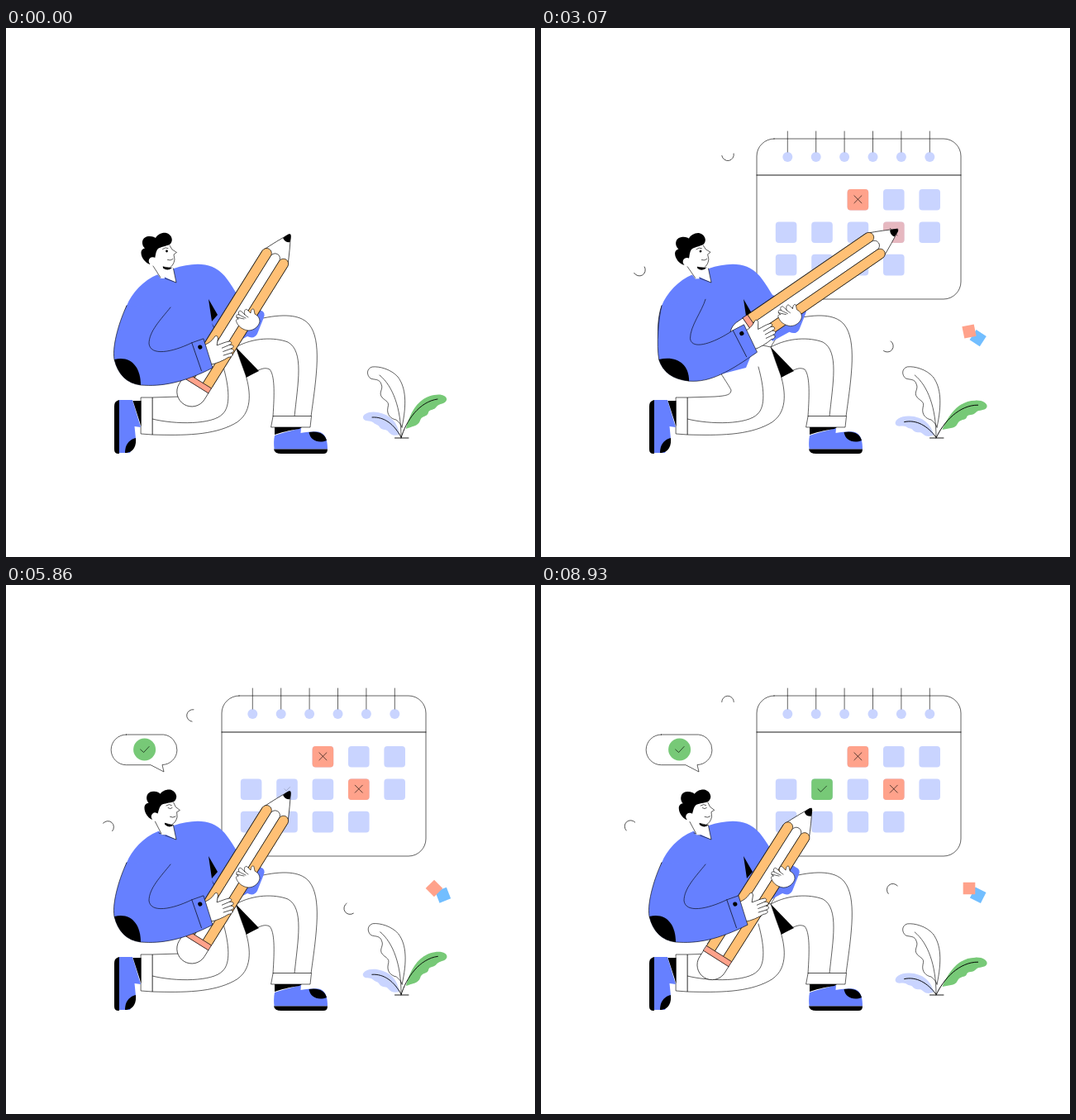
Write an HTML page that moves like this. It is 640 by 640 pixels and loops after 9 s.

```html
<!DOCTYPE html>
<html lang="en">
<head>
<meta charset="utf-8">
<title>Planning with a pencil</title>
<style>
  html, body { margin: 0; width: 100%; height: 100%; overflow: hidden; background: #fff; }
  svg { display: block; width: 100%; height: 100%; }
  .line, .skin, .edge { stroke: #000; stroke-width: .62; stroke-linejoin: round; stroke-linecap: round; }
  .line { fill: none; }
  .skin, .white { fill: #fff; }
  .bold { stroke-width: .9; }
  .blue { fill: #6680ff; }
  .lilac { fill: #c9d4ff; }
  .coral { fill: #ffa28b; }
  .green { fill: #77c977; }
  .orange { fill: #ffc075; }
</style>
</head>
<body>
<svg viewBox="0 0 640 640" xmlns="http://www.w3.org/2000/svg">
  <g id="calendar">
    <rect class="skin" x="261" y="134" width="247" height="194" rx="21"/>
    <path class="line bold" d="M261 178H508"/>
    <g id="pins"></g>
    <g id="dates"></g>
  </g>

  <g id="arcs"></g>
  <rect id="sqBlue" x="-7.3" y="-7.3" width="14.6" height="14.6" fill="#72beff"/>
  <rect id="sqCoral" class="coral" x="-7.3" y="-7.3" width="14.6" height="14.6"/>

  <g id="bubble">
    <path class="skin" d="M145.500 181H190.500A18.300 18.300 0 0 1 189 217.500L191 226L175 217.700H145.500A18.350 18.350 0 0 1 145.500 181Z"/>
  </g>
  <g id="tick">
    <circle class="green" r="13.500"/>
    <path class="line" d="M-5 0L-1 3.500L5.500 -3.500"/>
  </g>

  <g id="leafLilac">
    <path class="lilac" d="M476 492C474 478 466 468 450 465C440 463 431 467 432 472C434 477 440 474 444 477C448 481 450 479 452 483C456 488 460 484 463 489C467 494 472 493 476 492Z"/>
    <path class="line bold" d="M443 471C458 470 470 480 478 495"/>
  </g>
  <g id="leafGreen">
    <path class="green" d="M484 484C490 462 500 447 518 444C528 442 534 446 533 450C532 455 524 454 521 458C518 463 512 461 511 465C510 471 503 468 501 475C499 482 490 482 484 485Z"/>
    <path class="line bold" d="M478 496C484 475 500 452 522 449"/>
  </g>
  <g id="leafWhite">
    <path class="skin" d="M479 483C485 455 484 435 474 422C466 413 452 409 443 410C436 412 436 420 441 424C446 426 452 424 454 431C457 437 450 441 455 447C460 452 464 452 462 459C460 468 466 473 472 474C476 477 478 480 479 483Z"/>
    <path class="line" d="M452 420C468 433 478 460 478 495"/>
  </g>
  <path class="line bold" d="M470.500 496H487"/>

  <g id="legs">
    <path class="skin" d="M278 386C290 365 300 353 311 351C340 345 358 348 367 359C382 378 376 420 369 470H323C325 440 325 420 319 413C313 410 308 413 303 415L290 423Z"/>
    <path class="line" d="M278 386C300 374 325 374 341 380C361 391 353 430 349 470"/>
    <path class="skin" d="M323.500 469.500H369.500L368 483H321Z"/>
    <path d="M278 386L306 415L290 423Z"/>
    <path class="skin" d="M217 417C224 428 228 434 230 438C230 444 224 445 210 446L177 447V492C215 493 250 493 276 479C299 467 296 440 290 420Q284 404 278 386L250 380Z"/>
    <path class="line" d="M263 410C270 435 272 458 262 467C250 480 205 480 177 473"/>
    <path class="skin" d="M163.500 447H177V492L163.500 491Z"/>
    <path class="blue" d="M137 450H153L163 483L155.500 482L157 497L150 514H137Z"/>
    <path d="M137 450V515C132 515 131 513 131 509V458C131 453 133 451 137 450Z"/>
    <path d="M153.500 451H163.500V482ZM144 514C144 504 149 498 157 496C158 506 154 514 144 514Z"/>
    <path class="blue" d="M325 493C340 488 350 486 357 484L356.500 490C364 489 372 488 378 488.500C386 490 389 497 389 509.500H324.500Q323.500 500 325 493Z"/>
    <path d="M325 483H358L355 485C342 487 333 489 325 492ZM324 509.500H389Q389 515 384 515H333Q325 515 324 509.500ZM366.500 489C378 487 386 491 388 499C378 503 368 499 366.500 489Z"/>
  </g>

  <g id="torso">
    <path class="blue" d="M184 298C166 305 152 321 146 336C141 350 140 370 144 385L170 405L217 419L248 411L264 372L288 345L280 323C268 303 260 290 241 286.500C229 284.500 215 287 203 291Z"/>
    <path class="line" d="M146 336C141 350 140 370 144 385"/>
    <path id="farSleeve" class="blue"/>
    <path d="M245 328L256 347L249 355ZM249 357L254 366L251 362Z"/>
    <path class="white" d="M185 298L206 308L202 289Z"/>
    <path class="line" d="M185 300L206 308L202.500 291"/>
  </g>

  <g id="head">
    <path class="white" d="M180 268L198 262L201 267L206 271L202 274L204 280Q204 287 197 290L190 289L192 303H187L175 286Z"/>
    <path class="line" d="M198 263L201 268L206.500 271.500L203 274L204 280Q203 287 198 290L190 289M178 288L187 302"/>
    <path d="M190 288.500Q196 291 201.500 289.500Q196 295 190 290.500Z"/>
    <path d="M181 254C183 250 189 247 194 248C201 250 203 258 198 262C193 264 187 265 184 267C181 270 181 276 180 279L174 286C168 284 163 277 163.500 271C164 268 166 267 168 266.500C163 262 164 253 172 252C177 251.500 180 253 181 254Z"/>
    <circle class="white" cx="177.500" cy="282" r="4.800"/>
    <path class="line" d="M189.500 267.500Q193 264.500 196 266.500M195.500 280.500Q199 282 202 279.500"/>
    <circle id="eye" cx="194.500" cy="270" r="1.400"/>
    <path id="lid" class="line" d="M192 270Q195 272 197 269.500"/>
  </g>

  <g id="pencil">
    <path class="skin" d="M-18 34Q-9 14 -1.500 1Q0 -1 1.500 1Q9 14 18 34V206H-18Z"/>
    <path d="M-4.800 8Q-2.500 0 0 -.8Q2.500 0 4.800 8Q0 11.500 -4.800 8Z"/>
    <g id="strips"></g>
    <path class="skin" d="M-18 215V224a18 18 0 0 0 36 0V215Z"/>
    <rect class="coral edge" x="-18" y="208" width="36" height="7"/>
  </g>

  <g id="farHand">
    <path class="skin" d="M279 350C278 347 280 346 282 347C280 343 283 341 285 343L289 347C287 342 290 339 292 341L296 345C296 341 299 338 300 341L301 346Q307 349 307 355C306 361 300 366 293 366C286 365 281 361 279 356C278 354 278 352 281 352Z"/>
    <path class="line" d="M279 350L288 352M282 347L290 351M289 347L293 350"/>
  </g>

  <g id="nearHand">
    <path class="skin" d="M-2 -11C6 -11 10 -14 14 -17C17 -18 18 -15 16 -12L13 -6C19 -6 24 -7 29 -6C32 -5 31 -2 28 -2C33 -1 33 3 28 3C32 5 31 8 27 8C29 11 27 13 22 12C15 14 6 15 -2 14Z"/>
    <path class="line" d="M28 -2L18 -1M28 3L18 3.500M27 8L17 8"/>
  </g>
  <path id="sleeve" class="blue edge"/>
  <path id="elbow"/>
  <g id="cuff">
    <path class="line" d="M-15 -18L-14 18"/>
    <circle cx="-7" cy="-10" r="2.600"/>
  </g>
</svg>
<script>
const LOOP = 9000;
const $ = id => document.getElementById(id);
const part = (t, from, to) => Math.max(0, Math.min(1, (t - from) / (to - from)));
const smooth = (...span) => { const x = part(...span); return x * x * (3 - 2 * x); };
const easeOut = (...span) => 1 - (1 - part(...span)) ** 3;
const wave = (t, period) => .5 - .5 * Math.cos(2 * Math.PI * t / period);
const set = (el, name, value) => el.setAttribute(name, value);
const place = (el, x, y, turn = 0, scale = 1) =>
  set(el, 'transform', `translate(${x} ${y}) rotate(${turn}) scale(${scale})`);
const swing = (id, turn, x, y) => set($(id), 'transform', `rotate(${turn} ${x} ${y})`);

function add(parent, tag, attrs) {
  const el = document.createElementNS('http://www.w3.org/2000/svg', tag);
  for (const name in attrs) set(el, name, attrs[name]);
  return parent.appendChild(el);
}

const pins = [];
for (let i = 0; i < 6; i++) {
  const x = 298.3 + i * 34.4;
  add($('pins'), 'circle', { class: 'lilac', cx: x, cy: 156, r: 6 });
  pins.push(add($('pins'), 'path', { class: 'line', d: `M${x} 150V125` }));
}

// Grid of days; the first two and the last cells are empty.
const dayAt = (col, row) => ({ x: 283.8 + col * 43.4, y: 195 + row * 39.4, width: 25.6, height: 25.6, rx: 4 });
for (let cell = 2; cell < 14; cell++)
  add($('dates'), 'rect', { class: 'lilac', ...dayAt(cell % 5, Math.floor(cell / 5)) });

const cross = 'M-4.500 -4.500L4.500 4.500M4.500 -4.500L-4.500 4.500';
const check = 'M-5 0L-1.500 3.500L5.500 -3.500';
function addMark(col, row, tone, d, start) {
  const day = dayAt(col, row);
  const tile = add($('dates'), 'rect', { class: tone, ...day });
  const sign = add($('dates'), 'path', { class: 'line', d });
  return t => {
    set(tile, 'opacity', part(t, start + 150, start + 390));
    set(sign, 'opacity', part(t, start, start + 250));
    place(sign, day.x + 12.8, day.y + 12.3, 0, easeOut(t, start, start + 420));
  };
}
const marks = [
  addMark(2, 0, 'coral', cross, 2150),
  addMark(3, 1, 'coral', cross, 2790),
  addMark(1, 1, 'green', check, 5740)
];

// Half rings turn a quarter per second and drift along (dx, dy).
const arcs = [
  { x: 226, y: 141, dx: 0, dy: 19, turn: -2, speed: -.0905 },
  { x: 108, y: 292, dx: 17, dy: 1, turn: 143, speed: .09 },
  { x: 426, y: 368, dx: -11, dy: 26, turn: -47, speed: -.09 }
];
for (const arc of arcs)
  arc.el = add($('arcs'), 'path', { class: 'line', d: 'M0 -7.300A7.300 7.300 0 0 1 0 7.300' });

['orange', 'white', 'orange'].forEach((tone, i) =>
  add($('strips'), 'path', { class: 'edge ' + tone, d: `M${i * 12 - 18} 208V34a6 6 0 0 1 12 0V208Z` }));

// Pencil tip, its tilt, and how far the near arm is lifted.
const ready  = { x: 343.5, y: 250, turn: 32, lift: 0 };
const first  = { x: 374, y: 214.5, turn: 37, lift: 1.22 };
const second = { x: 431.5, y: 244, turn: 55.5, lift: .75 };
const low    = { x: 327, y: 270.5, turn: 32.4, lift: -.6 };
const parked = { ...low, lift: 0 };
const moves = [[first, 500, 2300], [second, 2500, 3030], [low, 3400, 4200], [ready, 5200, 5870], [parked, 6400, 7100]];

function poseAt(t) {
  const pose = { ...ready };
  for (const [goal, from, to] of moves)
    for (const key in pose) pose[key] += (goal[key] - pose[key]) * smooth(t, from, to);
  return pose;
}

function drawArms({ lift, turn }) {
  const wx = 244.5 + 12 * lift, wy = 393.5 - 24 * lift, tilt = -17.4 - 11 * lift;
  const ax = 131 + 15.5 * lift, ay = 401;
  const bx = 163 + 21.5 * lift, by = 432 - 6.5 * lift;
  const ix = 173 + 10 * lift, iy = 382 - 8.5 * lift, top = 338 - 13 * lift;
  const c = Math.cos(tilt * Math.PI / 180), s = Math.sin(tilt * Math.PI / 180);
  const at = (x, y) => `${wx + x * c - y * s} ${wy + x * s + y * c} `;
  const tip = `Q${ax + 7} ${by - 3} ${bx} ${by}`;
  set($('sleeve'), 'd', `M146 336C${.3 * ax + 99} 352 ${ax - 3} ${ay - 18} ${ax} ${ay}${tip}`
    + `C${bx + 26} ${by + 2} ${at(-40, 25)}${at(0, 18.5)}L${at(0, -18.5)}L${at(-15, -18)}`
    + `C${at(-42, -14)}${ix + 2} ${iy + 15} ${ix} ${iy}C${ix} ${iy - 15} ${ix + 14} ${top + 15} 199 ${top}`);
  set($('elbow'), 'd', `M${ax} ${ay}${tip}C${bx} ${by - 22} ${ax + 20} ${ay - 5} ${ax} ${ay}Z`);
  place($('cuff'), wx, wy, tilt);
  place($('nearHand'), wx, wy, tilt);

  const up = Math.max(0, lift), lean = turn - 32;
  const hx = 5 * up + .2 * lean, hy = .25 * lean - 15 * up;
  place($('farHand'), hx, hy);
  const far = (x, y) => `${x + hx} ${y + hy} `;
  set($('farSleeve'), 'd', `M262 310L280 323L${far(309, 342)}Q${far(314, 344)}${far(312, 350)}L${far(304, 370)}`
    + `Q${far(300, 377)}${far(292, 373)}L${far(272, 384)}L250 355Z`);
}

function drawHead(t) {
  const dip = Math.sin(Math.PI * part(t, 0, 4300));
  swing('head', 11 * smooth(t, 4000, 7700) - 2.6 * dip - 6.5 * smooth(t, 8000, LOOP), 198, 312);
  const shut = [1790, 5860, 8930].some(blink => Math.abs(t - blink) < 125);
  set($('eye'), 'opacity', shut ? 0 : 1);
  set($('lid'), 'opacity', shut ? 1 : 0);
}

function draw(t) {
  place($('calendar'), 0, -335 * (1 - easeOut(t, 100, 1000)));
  for (const pin of pins) set(pin, 'stroke-dasharray', `${25 * easeOut(t, 850, 1250)} 60`);
  for (const mark of marks) mark(t);

  const pop = easeOut(t, 950, 1400), drift = wave(t - 400, LOOP);
  for (const { el, x, y, dx, dy, turn, speed } of arcs)
    place(el, x + dx * drift, y + dy * drift, turn + speed * t, pop);
  place($('sqCoral'), 518, 367, 124 - .0441 * t, pop);
  place($('sqBlue'), 528.7, 375.2, .045 * t - 105, pop);

  const size = easeOut(t, 4250, 4750);
  place($('bubble'), 209 * (1 - size), 226 * (1 - size), 0, size);
  place($('tick'), 167.6, 199, 0, easeOut(t, 4700, 5100));

  const sway = 8.8 * wave(t, 2000);
  swing('leafGreen', sway, 478, 496);
  swing('leafLilac', -sway, 478, 496);
  swing('leafWhite', 3 * wave(t, 1000), 478, 496);

  const pose = poseAt(t);
  place($('pencil'), pose.x, pose.y, pose.turn);
  drawArms(pose);
  drawHead(t);
}

const start = performance.now();
function tick(now) {
  draw(Math.max(0, now - start) % LOOP);
  requestAnimationFrame(tick);
}
draw(0);
requestAnimationFrame(tick);
</script>
</body>
</html>
```
